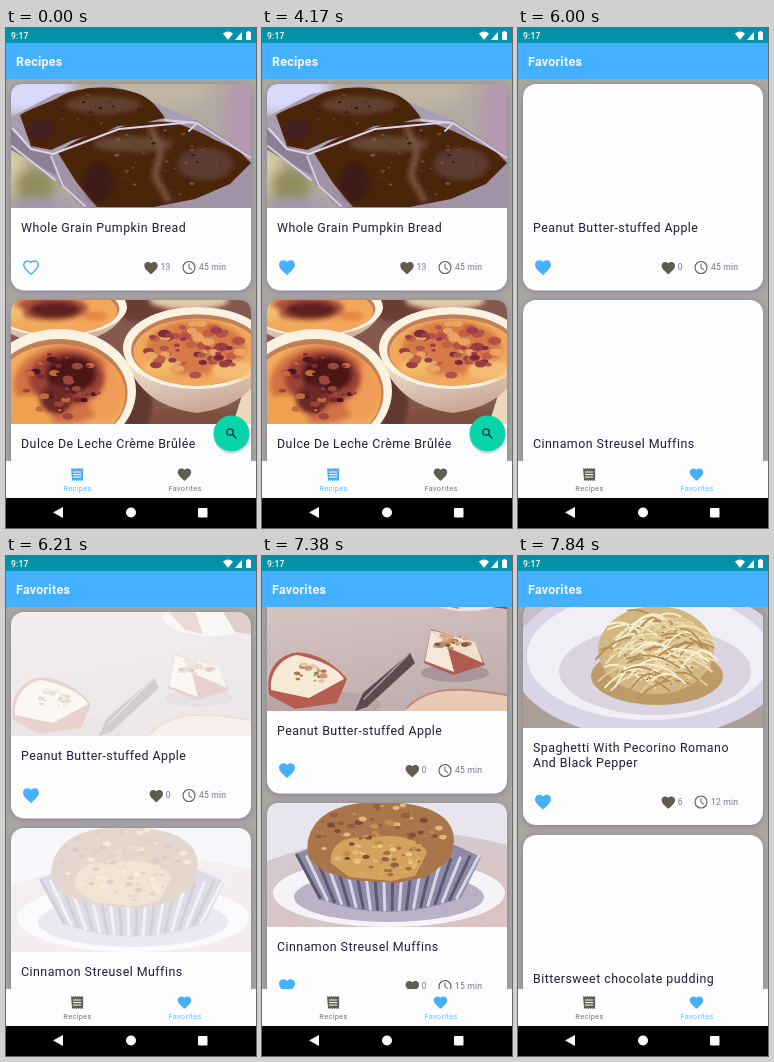
Write an HTML page that moves like this. It is 250x500 px and loops after 8 s.

```html
<!DOCTYPE html>
<html lang="en">
<head>
<meta charset="utf-8">
<title>Recipe app</title>
<style>
  html, body { margin: 0; width: 100%; height: 100%; overflow: hidden; }
  svg { display: block; width: 100vw; height: 100vh; font-family: Roboto, sans-serif; }
  .title { font-size: 12.4px; letter-spacing: .47px; fill: #201e34; }
  .bar { font-weight: 700; letter-spacing: .3px; fill: #f3faff; }
  .meta { font-size: 8.6px; letter-spacing: .15px; fill: #77768a; }
  .clock { font-weight: 500; fill: #fff; }
  .label { font-size: 7.3px; letter-spacing: .38px; text-anchor: middle; opacity: .85; }
  .card { filter: drop-shadow(0 1px 3px rgba(100, 95, 165, .6)); }
</style>
</head>
<body>
<svg id="stage" viewBox="0 0 250 500"></svg>
<script>
const LOOP = 8000;
const BLUE = '#45b0fe', DARK = '#5e5d50', PAPER = '#fdfcff';
const HEART = 'M12 21.3l-1.5-1.3C5.4 15.4 2 12.3 2 8.5 2 5.4 4.4 3 7.5 3c1.7 0 3.4.8 4.5 2.1C13.1 3.8 14.8 3 16.5 3 19.6 3 22 5.4 22 8.5c0 3.8-3.4 6.9-8.5 11.5z';

let seed = 7;
const rand = () => (seed = seed * 16807 % 2147483647) / 2147483647;
const range = (n, make) => Array.from({ length: n }, (_, i) => make(i)).join('');

const shape = (d, fill, more = '') => `<path d="${d}" fill="${fill}" ${more}/>`;
const line = (d, color, width) => shape(d, 'none', `stroke="${color}" stroke-width="${width}" stroke-linecap="round" stroke-linejoin="round"`);
const oval = (x, y, rx, ry, fill, more = '') => `<ellipse cx="${x}" cy="${y}" rx="${rx}" ry="${ry}" fill="${fill}" ${more}/>`;
const box = (x, y, w, h, fill, more = '') => `<rect x="${x}" y="${y}" width="${w}" height="${h}" fill="${fill}" ${more}/>`;
const text = (x, y, cls, str, more = '') => `<text x="${x}" y="${y}" class="${cls}" ${more}>${str}</text>`;
const move = (x, y, inner) => `<g transform="translate(${x} ${y})">${inner}</g>`;
const soft = (inner, level = 'blur') => `<g filter="url(#${level})">${inner}</g>`;

const heart = (x, y, size, paint) =>
  `<path d="${HEART}" transform="translate(${x} ${y}) scale(${size / 20}) translate(-12 -12)" ${paint}/>`;

// Seeded blotches inside an ellipse.
const specks = (n, x, y, rx, ry, size, colors) => range(n, () => {
  const a = rand() * 2 * Math.PI, r = Math.sqrt(rand()), s = size * (.4 + rand());
  return oval((x + rx * r * Math.cos(a)).toFixed(1), (y + ry * r * Math.sin(a)).toFixed(1),
    s.toFixed(1), (s * .6).toFixed(1), colors[Math.floor(rand() * colors.length)]);
});

const ramekin = (x, y, rx, ry, depth) =>
  shape(`M${x - rx} ${y}Q${x - rx * .85} ${y + depth + ry * .8} ${x} ${y + depth + ry}Q${x + rx * .85} ${y + depth + ry * .8} ${x + rx} ${y}z`, 'url(#wall)')
  + oval(x, y, rx, ry, '#fbf2e2') + oval(x, y + 2, rx * .89, ry * .87, '#c08058')
  + oval(x, y + 4, rx * .86, ry * .82, '#f3a95c');

const photos = {
  bread: () => box(0, 0, 240, 124, '#b3a9a2')
    + soft(oval(10, 0, 52, 30, '#dad8fb') + oval(150, 4, 50, 20, '#c0b5a2') + oval(240, 40, 28, 60, '#b499ae')
      + oval(2, 82, 12, 30, '#d3cba0') + oval(24, 102, 20, 18, '#918c5c') + oval(30, 124, 40, 10, '#a698b4')
      + oval(230, 122, 40, 18, '#b793ab'), 'haze')
    + shape('M0 33L44 10 100 0 183 36 180 48 90 80 44 96 0 62z', '#a99db2')
    + shape('M0 45L20 62 42 70 46 92 0 66z', '#8d7f92')
    + shape('M9 31C20 24 32 21 45 15 54 9 62 7 71 5.5 84 2 110 3 127 9.6 138 14 146 22 154 34L104 45 62 56 40 66 20 62z', '#4b2509')
    + shape('M40 73L107 42 186 36 240 72V124H72L48 100z', '#a292a6')
    + shape('M47 69C56 62 64 57 71 54 84 49 96 47 107 44 120 39 132 37 143 38 156 37 166 39 173 42 184 46 196 51 204 56 216 61 226 66 230 69L240 79 219 100 184 115 143 123H86L66 99z', '#4b2509')
    + soft(oval(30, 46, 12, 10, '#452028') + oval(92, 21, 38, 9, '#62402f') + oval(122, 60, 40, 8, '#684634')
      + oval(194, 80, 28, 16, '#5d3b32') + oval(88, 98, 14, 20, '#3d1a18') + shape('M139 42L150 66 144 92 158 118', 'none', 'stroke="#7a5648" stroke-width="6"'))
    + specks(65, 146, 79, 62, 34, 1.8, ['#76564b', '#3b1a06', '#68452f', '#442018'])
    + specks(28, 84, 30, 50, 20, 1.5, ['#684536', '#3b1a06', '#573220'])
    + line('M2 45L20 65 42 70 108 45 182 38', '#ddd6eb', 2)
    + line('M40 72L52 102 74 122M154 36L186 39 178 47M186 39L240 74M1 62L44 96', '#d7cfe2', 1.8),

  brulee: () => box(0, 0, 240, 124, '#835a4d')
    + soft(oval(130, 4, 28, 18, '#6d3d33') + oval(178, 0, 40, 10, '#e2c7a8') + oval(190, 121, 70, 13, '#7e4f40')
      + oval(126, 104, 15, 30, '#60382f'))
    + shape('M222 124L232 92 240 84V124z', '#ecd9bb')
    + ramekin(46, 7, 70, 29, 10)
    + soft(oval(40, 8, 37, 12, '#a84f3b') + oval(44, 10, 25, 8, '#5d211f') + oval(84, 16, 12, 5, '#e98342') + oval(0, 13, 13, 8, '#f3bd6e'))
    + ramekin(186, 48, 74, 41, 24)
    + soft(oval(185, 48, 50, 27, '#d57947') + oval(150, 66, 17, 9, '#f1bc68') + oval(222, 70, 22, 10, '#f3bd75'))
    + soft(specks(70, 184, 50, 50, 27, 5, ['#9b3d43', '#b3514a', '#7c2c39', '#e9a462', '#c26046']), 'slight')
    + ramekin(48, 91, 77, 62, 12)
    + soft(oval(54, 85, 51, 39, '#d17143') + oval(94, 93, 18, 27, '#ef9b55') + oval(18, 113, 25, 18, '#efa24d') + oval(56, 78, 38, 27, '#9b4037')
      + oval(60, 74, 25, 18, '#4c1618') + oval(45, 99, 16, 15, '#6b2828'))
    + soft(specks(42, 54, 83, 40, 34, 4, ['#4c1820', '#792b32', '#9c4639', '#c1683d']), 'slight'),

  apple: () => box(0, 0, 240, 124, 'url(#board)')
    + oval(200, 4, 48, 20, '#efe3dc') + shape('M158 0L174 18 192 22 184 0z', '#b97b70') + shape('M212 0L224 20 240 22V0z', '#8d5148')
    + oval(52, 118, 62, 14, '#b9a5a8')
    + shape('M2 108C-2 84 10 70 26 66 44 62 70 78 80 92L70 116 28 122z', '#b65d52')
    + shape('M4 103C2 84 16 70 30 68 50 72 70 80 77 92L42 111z', '#f6e9d6')
    + specks(22, 43, 87, 17, 10, 3, ['#c49a72', '#a87756', '#e5c69c'])
    + shape('M143 66L96 106 88 124 100 120 148 76z', '#5c4a4e') + line('M141 68L97 112', '#aaa0a8', 1.5)
    + oval(188, 86, 34, 9, '#a9969b')
    + shape('M157 76L164 42 208 56 218 78 186 88z', '#ae5c50') + shape('M158 74L164 43 180 58 187 85z', '#f6e8da')
    + shape('M164 43L208 55 216 76 184 62z', '#f2dfcb') + specks(24, 185, 55, 18, 8, 3, ['#8a5a46', '#bc8c63', '#d3aa82'])
    + shape('M138 124C154 100 188 98 240 108V124z', '#ecc9b4') + line('M140 121C160 100 190 99 239 108', '#c08a78', 2),

  muffin: () => box(0, 0, 240, 124, 'url(#cloth)')
    + shape('M0 0H240V42Q130 10 0 58z', '#e9e5ee') + oval(122, 90, 116, 34, '#f5f2f8') + oval(122, 94, 95, 25, '#b9b2c6')
    + shape('M28 51L48 43 188 42 214 54 194 95Q122 122 52 96z', '#8d8aa8')
    + range(20, i => line(`M${30 + i * 9.6} ${52 + 9 * Math.sin(i / 19 * Math.PI)}L${53 + i * 7.2} ${95 + 12 * Math.sin(i / 19 * Math.PI)}`, i % 2 ? '#d8d5e4' : '#5d5871', 3))
    + shape('M42 55C36 35 48 12 72 5 94-4 146-3 168 9 190 20 190 40 182 57L160 74 130 80 84 77 56 68z', '#a9754b')
    + shape('M64 60C62 38 84 32 98 36 118 30 154 32 160 50L148 73 124 78 82 74z', '#d3a25f')
    + soft(specks(75, 113, 33, 64, 33, 3.2, ['#7c4c38', '#c48d54', '#e2b978', '#93603e'])
      + specks(45, 113, 57, 42, 17, 2.6, ['#e9c982', '#a86e40', '#d5a75f']), 'slight'),

  spaghetti: () => box(0, 0, 240, 124, '#a99f94') + shape('M0 0H110L0 50z', '#c8bec5')
    + oval(126, 56, 138, 78, '#d9d5e6') + oval(126, 52, 122, 64, '#f2eef5') + oval(132, 67, 96, 44, '#dad4e2')
    + oval(134, 72, 66, 29, '#bd9a68') + oval(133, 46, 58, 44, '#d2b782')
    + range(95, () => {
      const a = rand() * 2 * Math.PI, r = Math.sqrt(rand());
      const x = 133 + 43 * r * Math.cos(a), y = 50 + 36 * r * Math.sin(a), dx = 12 + rand() * 16, dy = rand() * 26 - 13;
      return line(`M${x - dx} ${y + dy}Q${x} ${y - 16} ${x + dx} ${y - dy / 2}`,
        ['#f1e1b8', '#e4cd98', '#faf0d2', '#b58d59'][Math.floor(rand() * 4)], 1.8);
    }) + specks(24, 136, 50, 48, 36, .8, ['#65503e']),

  none: () => ''
};

function card(top, photo, lines, likes, minutes, toggles = false) {
  const extra = (lines.length - 1) * 14.5, row = 183.5 + extra, count = String(likes);
  const hx = 145.3 - 5.3 * (count.length - 1);
  const left = toggles
    ? heart(20, row, 14.5, `id="outline" fill="none" stroke="${BLUE}" stroke-width="2"`) + heart(20, row, 16, `id="solid" fill="${BLUE}"`)
    : heart(20, row, 16, `fill="${BLUE}"`);
  return move(5, top,
    box(0, 0, 240, 206.5 + extra, PAPER, 'rx="13" class="card"')
    + `<g clip-path="url(#round)"><g class="photo">${photos[photo]()}</g></g>`
    + lines.map((str, i) => text(10, 147.5 + i * 15, 'title', str)).join('')
    + left + heart(hx, row + .5, 13.5, `fill="${DARK}"`) + text(hx + 9.5, row + 2.5, 'meta', count)
    + `<circle cx="178" cy="${row}" r="6" fill="none" stroke="${DARK}" stroke-width="1.1"/>`
    + line(`M178 ${row - 3.5}V${row + .5}L180.8 ${row + 2}`, DARK, 1)
    + text(188, row + 2.5, 'meta', minutes + ' min'));
}

const stop = (at, color) => `<stop offset="${at}" stop-color="${color}"/>`;
const fade = (id, from, to) => `<linearGradient id="${id}" x2=".4" y2="1">${stop(0, from)}${stop(1, to)}</linearGradient>`;
const blur = (id, size) => `<filter id="${id}" x="-30%" y="-30%" width="160%" height="160%" color-interpolation-filters="sRGB"><feGaussianBlur stdDeviation="${size}"/></filter>`;
const defs = `<defs>
  <clipPath id="round"><path d="M0 124V13Q0 0 13 0H227Q240 0 240 13V124z"/></clipPath>
  <clipPath id="list"><rect y="51" width="250" height="382"/></clipPath>
  <clipPath id="tabs"><rect y="433" width="250" height="37"/></clipPath>
  ${fade('wall', '#fbf0dc', '#c9a999')}${fade('board', '#d6c7c4', '#c2afb0')}${fade('cloth', '#d2ccd8', '#d9c4c2')}
  ${blur('slight', .6)}${blur('blur', 2.5)}${blur('haze', 6)}</defs>`;

const recipes = card(56, 'bread', ['Whole Grain Pumpkin Bread'], 13, 45, true)
  + card(272, 'brulee', ['Dulce De Leche Crème Brûlée'], 8, 50);
const favorites = card(56, 'apple', ['Peanut Butter-stuffed Apple'], 0, 45)
  + card(272, 'muffin', ['Cinnamon Streusel Muffins'], 0, 15)
  + card(488, 'spaghetti', ['Spaghetti With Pecorino Romano', 'And Black Pepper'], 6, 12)
  + card(719, 'none', ['Bittersweet chocolate pudding'], 2, 30);

const fab = oval(225.5, 408, 18, 18, '#cfcdf0', 'opacity=".75"') + oval(225.5, 405.5, 18, 18, '#08d4aa')
  + oval(224, 404, 3.2, 3.2, 'none', 'stroke="#17313a" stroke-width="1.3"') + line('M226.5 406.5L230 410', '#17313a', 1.5);

const statusBar = box(0, 0, 250, 15, '#0392ab') + text(5, 11, 'meta clock', '9:17')
  + shape('M217 5.5Q222 1.5 227 5.5L222 12z', '#fff') + shape('M229 12L236 4V12z', '#fff')
  + shape('M240 4H241.3V3H243.7V4H245V12H240z', '#fff');

const tabs = box(0, 433, 250, 37, PAPER)
  + `<g clip-path="url(#tabs)">${oval(200, 451, 35, 35, '#d9d8fc', 'id="ripple"')}</g>`
  + `<g id="tabRecipes">${shape('M65 440l1.1 1 1.1-1 1.1 1 1.1-1 1.1 1 1.1-1 1.1 1 1.1-1 1.1 1 1.1-1 1.1 1V453l-1.1-1-1.1 1-1.1-1-1.1 1-1.1-1-1.1 1-1.1-1-1.1 1-1.1-1-1.1 1z', 'currentColor')}
    ${line('M67.5 444H74.7M67.5 446.5H74.7M67.5 449H74.7', PAPER, 1.1)}${text(71.5, 463, 'label', 'Recipes', 'fill="currentColor"')}</g>`
  + `<g id="tabFavorites">${heart(178.5, 446.5, 13.5, 'fill="currentColor"')}${text(179, 463, 'label', 'Favorites', 'fill="currentColor"')}</g>`;

const systemBar = box(0, 470, 250, 30, '#000') + shape('M47 484.5L57 479V490z', '#fff')
  + oval(125, 484.5, 5, 5, '#fff') + box(192, 480, 9.5, 9.5, '#fff', 'rx=".8"');

document.getElementById('stage').innerHTML = defs + box(0, 0, 250, 500, '#aaa79f')
  + `<g clip-path="url(#list)"><g id="recipes">${recipes}${oval(28, 240.5, 17, 13.5, '#8a8af0', 'id="tap"')}</g><g id="favorites">${favorites}</g></g>`
  + box(0, 15, 250, 36, BLUE) + text(10, 38.3, 'title bar', '', 'id="heading"')
  + `<g id="fab">${fab}</g>` + statusBar + tabs + systemBar;

const $ = id => document.getElementById(id);
const show = (id, on) => { $(id).style.display = on ? '' : 'none'; };
const photoLayers = document.querySelectorAll('#favorites .photo');

// Each step is [time, value]; a value holds until the next step.
const held = (steps, t) => steps.reduce((value, [at, next]) => t >= at ? next : value, steps[0][1]);
const SCROLL = [[0, 0], [7380, 25], [7420, 55], [7500, 95], [7750, 317], [7840, 440]];
const PHOTO = [[0, 0], [6070, .08], [6140, .16], [6210, .27], [6300, .6], [6420, 1]];
const TAP = [[0, 0], [4250, .06], [4380, 0]];
const RIPPLE = [[0, 0], [5630, 1], [6000, 0]];

function render(t) {
  const switched = t >= 5710, listed = t >= 6000, liked = t >= 4170;
  show('recipes', !listed);
  show('fab', !listed);
  show('favorites', listed);
  show('outline', !liked);
  show('solid', liked);
  $('tap').style.opacity = held(TAP, t);
  $('ripple').style.opacity = held(RIPPLE, t);
  $('heading').textContent = switched ? 'Favorites' : 'Recipes';
  $('tabRecipes').style.color = switched ? DARK : BLUE;
  $('tabFavorites').style.color = switched ? BLUE : DARK;
  $('favorites').setAttribute('transform', `translate(0 ${-held(SCROLL, t)})`);
  photoLayers.forEach(layer => { layer.style.opacity = held(PHOTO, t); });
}

const start = performance.now();
function tick() {
  render((performance.now() - start) % LOOP);
  requestAnimationFrame(tick);
}
tick();
</script>
</body>
</html>
```
